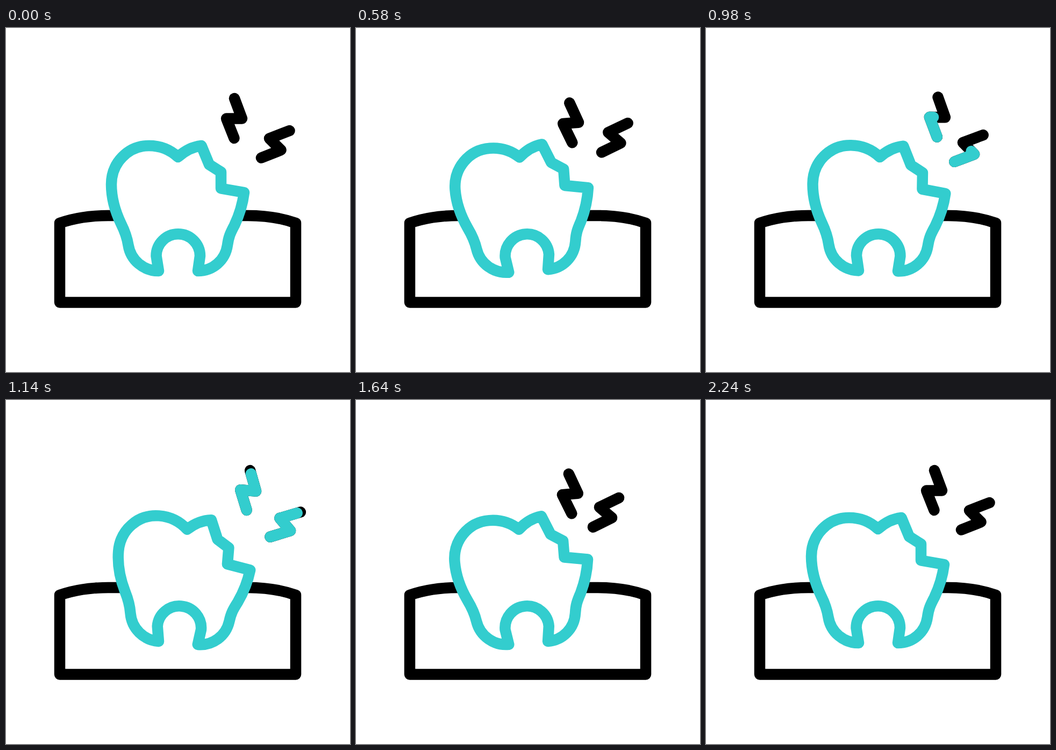
Write an HTML page that moves like this. It is 640 px wide and 640 px high and loops after 2400 ms.

```html
<!DOCTYPE html>
<html lang="en">
<head>
<meta charset="utf-8">
<title>Toothache</title>
<style>
  html, body { margin: 0; height: 100%; overflow: hidden; background: #fff; }
  svg { display: block; width: 100%; height: 100%; }
  path { fill: none; stroke: #000; stroke-width: 20.5; stroke-linecap: round; stroke-linejoin: round; }
  .cyan { stroke: #33cdce; }
  #tooth { fill: #fff; }
</style>
</head>
<body>
<svg viewBox="0 0 640 640">
  <path d="M100 363C130 352.500 160 349 190 349H450C480 349 510 352.500 539 363V510.500H100Z"/>
  <g id="sway">
    <path id="tooth" class="cyan" d="M320 240C332 229 346 221 363.500 219L378 254L400 268V298.500L443 306
      C440 330 434 348 425 367C417 382 414 389 412 404C408 432 385 452 357 452L361 424
      A40.500 40.500 0 1 0 279.500 424L284 452C256 452 232 432 227.500 404
      C225 388 221 378 214 364C203 341 196 318 196 291C196 251 227 219 266 219C287 219 306 227 320 240Z"/>
  </g>
</svg>
<script>
const LOOP = 2400;
const sway = document.getElementById('sway');

const smooth = x => {
  x = Math.min(1, Math.max(0, x));
  return x * x * (3 - 2 * x);
};

// Eases through evenly spaced key values.
const keys = (t, start, step, values) => values.slice(1).reduce(
  (sum, v, i) => sum + (v - values[i]) * smooth((t - start) / step - i), values[0]);

function addBolt(d, dx, dy, start) {
  const group = document.createElementNS('http://www.w3.org/2000/svg', 'g');
  group.innerHTML = `<path d="${d}"/><path class="cyan" d="${d}" pathLength="1"/>`;
  sway.append(group);
  return { group, glow: group.lastChild, dx, dy, start };
}

const bolts = [
  addBolt('M424.500 205L410 168.500H439L425 131', 0.3, -0.954, 300),
  addBolt('M475 241.500L511.500 227L490 205.500L527.500 191', 0.954, -0.3, 500)
];

function draw(t) {
  const angle = keys(t, 200, 500, [0, -5, 5, -5, 0]);
  sway.setAttribute('transform', `rotate(${angle} 320 450)`);

  const tail = smooth((t - 1200) / 400);
  const head = smooth((t - 800) / 400);
  for (const { group, glow, dx, dy, start } of bolts) {
    const push = keys(t, start, 400, [0, -20, 11, -20, 0]);
    group.setAttribute('transform', `translate(${push * dx} ${push * dy})`);
    glow.style.display = head > tail ? '' : 'none';
    glow.style.strokeDasharray = `${head - tail} 2`;
    glow.style.strokeDashoffset = -tail;
  }
}

const origin = performance.now();
function frame() {
  draw((performance.now() - origin) % LOOP);
  requestAnimationFrame(frame);
}
frame();
</script>
</body>
</html>
```
